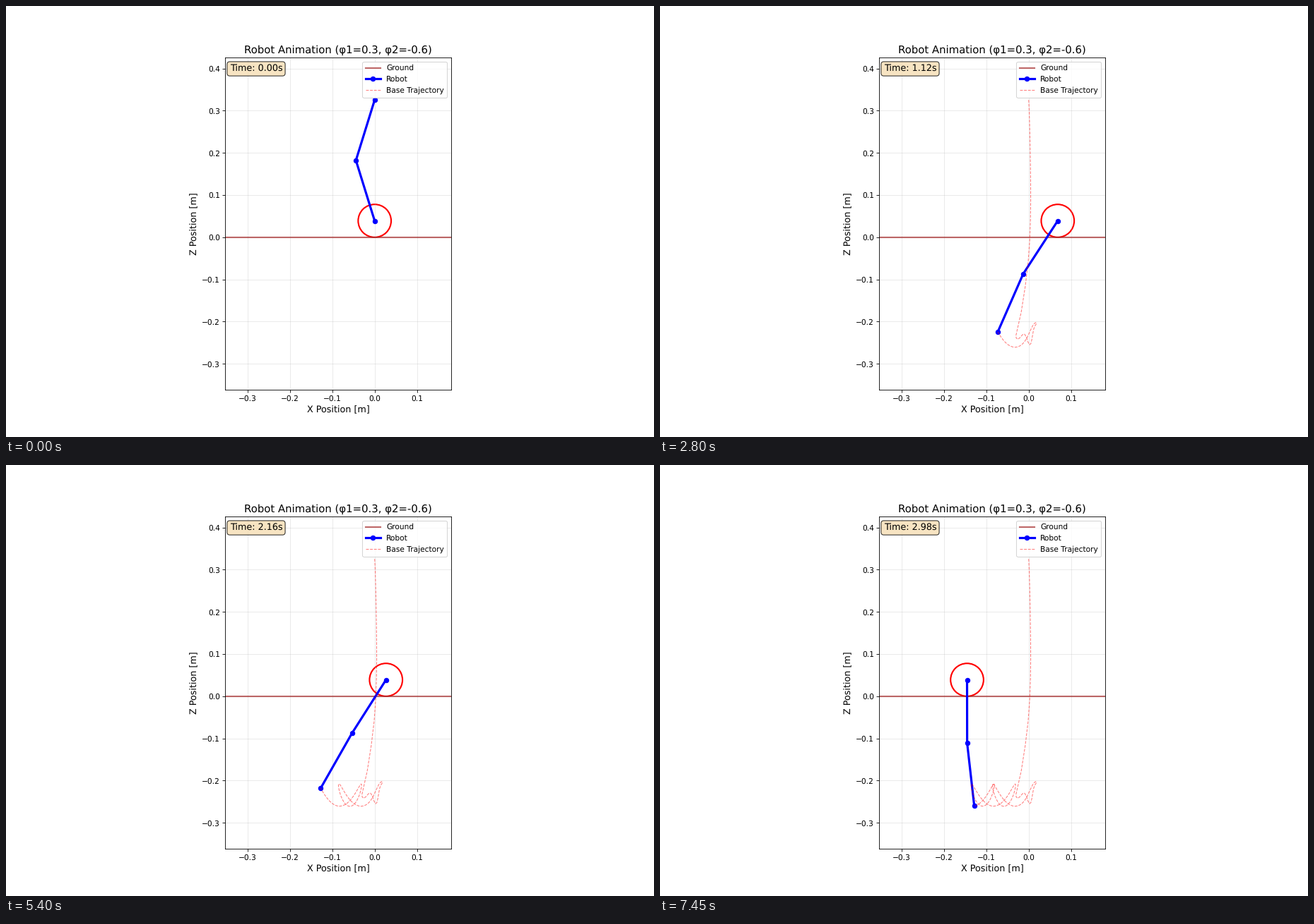
Recreate the animation shown at these times as a matplotlib script. Size 917 by 611 pixels, loop 7500 ms.

```python
import numpy as np
import matplotlib.pyplot as plt
from matplotlib.animation import FuncAnimation
from matplotlib.patches import Circle

FRAMES, INTERVAL, DT = 150, 50, 0.02
R, L, G = 0.039, 0.15, 9.81
LANDING = 0.33          # the leg snaps straight and ends the free fall
SWING = 0.5075          # half a period of the pendulum swing
T = np.arange(FRAMES) * DT


def rise(t, mid, width):
    """Soft step from 0 to 1."""
    return 1 / (1 + np.exp(-(t - mid) / width))


def hanging_bend(t, phase):
    """Half the knee bend in degrees: two dying wobbles, then the swing."""
    wobble = -20 * np.exp(-((t - 0.4) / 0.62) ** 2) * np.sin(
        np.pi * (t - 0.505) / 0.435)
    snap = 17 * np.exp(-(t - 0.455) / 0.2) * np.cos(
        2 * np.pi * (t - 0.455) / 0.25)
    return wobble + snap + 3.2 * rise(t, 1.6, 0.1) * np.sin(phase)


# Lean of the line from wheel to base
phase = np.pi * (T - 0.7115) / SWING
size = 34.6 + 9.8 * np.exp(-(T - 0.4) / 0.1)
lean = np.radians(size * rise(T, 0.32, 0.03) * np.cos(phase))

# Fold of the two links about that line
drop = 2 * L * np.cos(0.3) - G / 2 * T ** 2
fold = np.where(T < LANDING,
                np.arccos(np.clip(drop / (2 * L * np.cos(lean)), -1, 1)),
                np.pi - np.radians(hanging_bend(T, phase)))
th1, th2 = lean + fold, lean - fold

# The base recoils from wheel and knee and drifts once it hangs
dx = -L * (np.sin(th1) + np.sin(th2))
knee_out = L * (np.sin(fold) * np.cos(lean) - np.sin(0.3))
base_x = 0.23 * dx + 0.04 * knee_out - 0.0495 * np.maximum(T - LANDING, 0)
wheel_x = base_x - dx
knee_x = wheel_x - L * np.sin(th1)
knee_z = R + L * np.cos(th1)
base_z = knee_z + L * np.cos(th2)

plt.rcParams["font.family"] = "DejaVu Sans"
plt.rcParams["text.hinting"] = "none"
fig, ax = plt.subplots(figsize=(12.0066, 8), dpi=76.375)
ax.set_xlim(-0.3535, 0.1805)
ax.set_ylim(-0.361, 0.4256)
ax.set_aspect("equal")
ax.grid(True, alpha=0.3)
ax.set_xlabel("X Position [m]", fontsize=12)
ax.set_ylabel("Z Position [m]", fontsize=12)
ax.set_title("Robot Animation (φ1=0.3, φ2=-0.6)", fontsize=14)

ax.axhline(0, color="brown", lw=2, alpha=0.7, label="Ground")
robot, = ax.plot([], [], "o-", color="blue", lw=3, ms=6, label="Robot")
trail, = ax.plot([], [], "r--", lw=1, alpha=0.5, label="Base Trajectory")
wheel = ax.add_patch(Circle((0, R), R, fill=False, ec="red", lw=2))
clock = ax.text(0.02, 0.98, "", transform=ax.transAxes, fontsize=12, va="top",
                bbox=dict(boxstyle="round", facecolor="wheat", alpha=0.8))
ax.legend(loc="upper right", fontsize=10)


def update(i):
    robot.set_data([wheel_x[i], knee_x[i], base_x[i]],
                   [R, knee_z[i], base_z[i]])
    trail.set_data(base_x[:i + 1], base_z[:i + 1])
    wheel.center = wheel_x[i], R
    clock.set_text(f"Time: {T[i]:.2f}s")
    return robot, trail, wheel, clock


anim = FuncAnimation(fig, update, frames=FRAMES, interval=INTERVAL,
                     init_func=lambda: update(0), repeat=True, repeat_delay=0)
plt.show()
```
